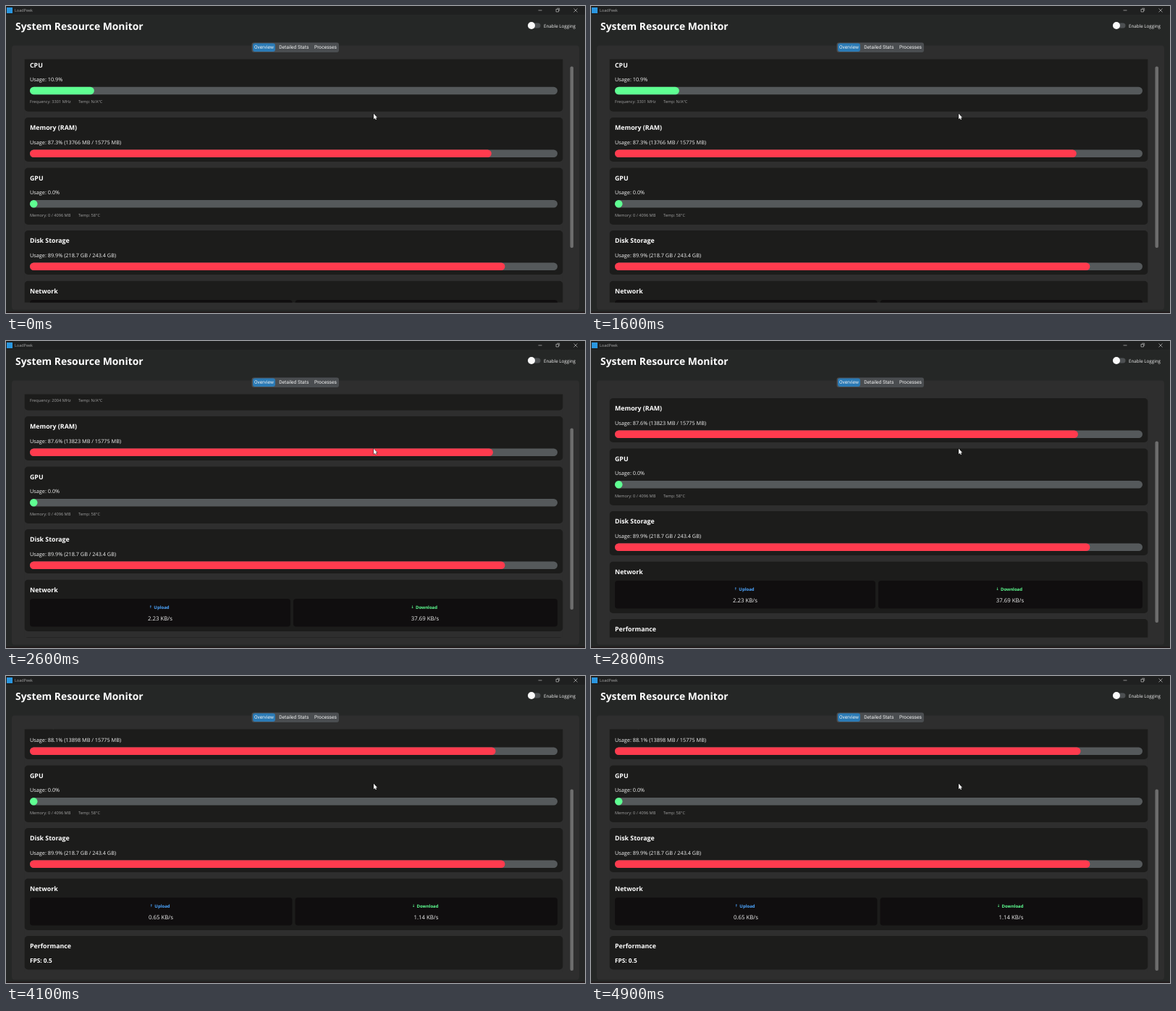
An HTML page with a canvas for the animation above (5 s loop, 800x424 px).

```html
<!DOCTYPE html>
<html lang="en">
<head>
<meta charset="utf-8">
<title>System Resource Monitor</title>
<style>
  html, body { margin: 0; width: 100%; height: 100%; overflow: hidden; background: #252726; }
  canvas { display: block; width: 800px; height: 424px; }
</style>
</head>
<body>
<canvas id="stage" width="800" height="424"></canvas>
<script>
const ctx = document.getElementById('stage').getContext('2d');
const SANS = '"Open Sans", "Noto Sans", sans-serif';
const TABS = 'Roboto, sans-serif';
const RED = '#ff3b4e', GREEN = '#5fff92', BLUE = '#4da6ff';
const PANEL = '#2e2e2e', CARD = '#1c1c1b', TRACK = '#55595b';
const VIEW = { x: 25.5, y: 73.5, right: 769.5, bottom: 409.5 };

const before = { cpu: 10.9, mhz: 3301, ram: 87.3, ramMB: 13766, up: '2.23', down: '37.69', split: [395.5, 399.5], mid: [213, 579] };
const during = { ...before, mhz: 2004, ram: 87.6, ramMB: 13823, split: [393, 397] };
const after = { ...during, ram: 88.1, ramMB: 13898, up: '0.65', down: '1.14', split: [395.5, 399.5], mid: [214, 580.5] };

// While "stale" is set, parts of the unscrolled view are still on screen.
const timeline = [
  { from: 0, scroll: 0, thumb: 84, data: before },
  { from: 2000, scroll: 50, thumb: 84, data: { ...during, split: before.split }, stale: true },
  { from: 2300, scroll: 50, thumb: 121, data: during },
  { from: 2800, scroll: 75, thumb: 139, data: during },
  { from: 4100, scroll: 100, thumb: 157, data: after }
];

function box(x, y, right, bottom, color, radius = 0) {
  ctx.fillStyle = color;
  ctx.beginPath();
  ctx.roundRect(x, y, right - x, bottom - y, radius);
  ctx.fill();
}

function text(str, x, y, size, { color = '#f2f2f2', weight = 400, family = SANS, align = 'left' } = {}) {
  ctx.font = `${weight} ${size}px ${family}`;
  ctx.textAlign = align;
  ctx.fillStyle = color;
  ctx.fillText(str, x, y);
}

function line(color, width, ...points) {
  ctx.strokeStyle = color;
  ctx.lineWidth = width;
  ctx.beginPath();
  for (const [x, y] of points) ctx.lineTo(x, y);
  ctx.stroke();
}

function card(title, top, bottom) {
  box(VIEW.x, top, VIEW.right, bottom, CARD, 5);
  text(title, 33, top + 17.2, 8.8, { color: '#fff', weight: 700 });
}

function meter(title, top, bottom, percent, color, detail = '', notes = []) {
  card(title, top, bottom);
  text(`Usage: ${percent.toFixed(1)}%${detail}`, 33, top + 36.5, 7.3);
  const y = top + 44.5, height = 10.5, left = 33, right = 762;
  const fill = height + percent / 100 * (right - left - height);
  box(left, y, right, y + height, TRACK, height / 2);
  box(left, y, left + fill, y + height, color, height / 2);
  notes.forEach((note, i) => text(note, 33 + 67 * i, top + 67, 5.65, { color: '#a0a0a0' }));
}

function rate(left, right, mid, arrow, label, value, color) {
  box(left, 406, right, 444.5, '#100e0f', 4);
  const half = label.length * 2.1;
  text(arrow, mid - half - .5, 419.4, 5, { color, weight: 700, family: '"DejaVu Sans", sans-serif', align: 'center' });
  text(label, mid + 2, 419.6, 6, { color, weight: 700, align: 'center' });
  text(`${value} KB/s`, mid, 436.3, 7.8, { align: 'center' });
}

function content(scroll, d, bands = [[VIEW.y, VIEW.bottom]]) {
  ctx.save();
  ctx.beginPath();
  for (const [top, bottom] of bands) ctx.rect(VIEW.x, top, VIEW.right - VIEW.x, bottom - top);
  ctx.clip();
  box(VIEW.x, VIEW.y, VIEW.right, VIEW.bottom, PANEL);
  ctx.translate(0, -scroll);
  meter('CPU', 67.3, 145.8, d.cpu, GREEN, '', [`Frequency: ${d.mhz} MHz`, 'Temp: N/A°C']);
  meter('Memory (RAM)', 154, 215, d.ram, RED, ` (${d.ramMB} MB / 15775 MB)`);
  meter('GPU', 223.5, 302, 0, GREEN, '', ['Memory: 0 / 4096 MB', 'Temp: 58°C']);
  meter('Disk Storage', 310, 371, 89.9, RED, ' (218.7 GB / 243.4 GB)');
  card('Network', 379.8, 451);
  rate(33, d.split[0], d.mid[0], '↑', 'Upload', d.up, BLUE);
  rate(d.split[1], 762, d.mid[1], '↓', 'Download', d.down, GREEN);
  card('Performance', 459, 505.5);
  text('FPS: 0.5', 33, 495.7, 8.3, { color: '#fff', weight: 700 });
  ctx.restore();
}

function windowFrame() {
  box(0, 0, 800, 424, '#252726');
  box(0, 0, 800, 12, '#1f2020');
  box(0, 422, 800, 424, '#211b1c');
  box(1, 2, 9, 10, '#2a97e0');
  text('LoadPeek', 12, 8.3, 5.5, { color: '#a5a5a5' });
  const icon = '#a8a8a8';
  line(icon, .8, [735.5, 6], [740.5, 6]);
  line(icon, .8, [760, 4.5], [763.5, 4.5], [763.5, 8], [760, 8], [760, 4.1]);
  line(icon, .7, [761.2, 3.2], [764.7, 3.2], [764.7, 6.8]);
  line(icon, .8, [784.5, 3.5], [789.5, 8.5]);
  line(icon, .8, [789.5, 3.5], [784.5, 8.5]);

  text('System Resource Monitor', 13, 33.2, 13.87, { color: '#fff', weight: 700 });
  box(721, 23.5, 738.5, 30.5, '#4d5052', 3.5);
  box(721, 22, 731, 32, '#fafafa', 5);
  text('Enable Logging', 743, 29.8, 6.25);

  box(8, 54.5, 792, 419.5, PANEL, 4);
  box(339.5, 50.5, 460, 64, '#4a4d50', 3);
  box(341, 51.5, 372, 63, '#2b7ab5', 3);
  text('Overview', 343, 59.4, 6.65, { family: TABS });
  text('Detailed Stats', 377.2, 59.4, 6.65, { family: TABS });
  text('Processes', 426, 59.4, 6.65, { family: TABS });
}

function pointer() {
  const shape = new Path2D('M508 148.8v7.4l1.7-1.5 1.1 2.4 1.2-.6-1.1-2.3h2.2z');
  ctx.strokeStyle = '#111';
  ctx.lineWidth = 1;
  ctx.stroke(shape);
  ctx.fillStyle = '#fff';
  ctx.fill(shape);
}

function draw() {
  const time = performance.now() % 5000;
  const state = timeline.findLast(step => step.from <= time);
  ctx.textRendering = 'geometricPrecision';
  windowFrame();
  content(state.scroll, state.data);
  if (state.stale) content(0, state.data, [[360, 401], [408, VIEW.bottom]]);
  box(779.5, state.thumb - .5, 784, state.thumb + 250, '#6d6d6d', 2);
  pointer();
  requestAnimationFrame(draw);
}
draw();
</script>
</body>
</html>
```
